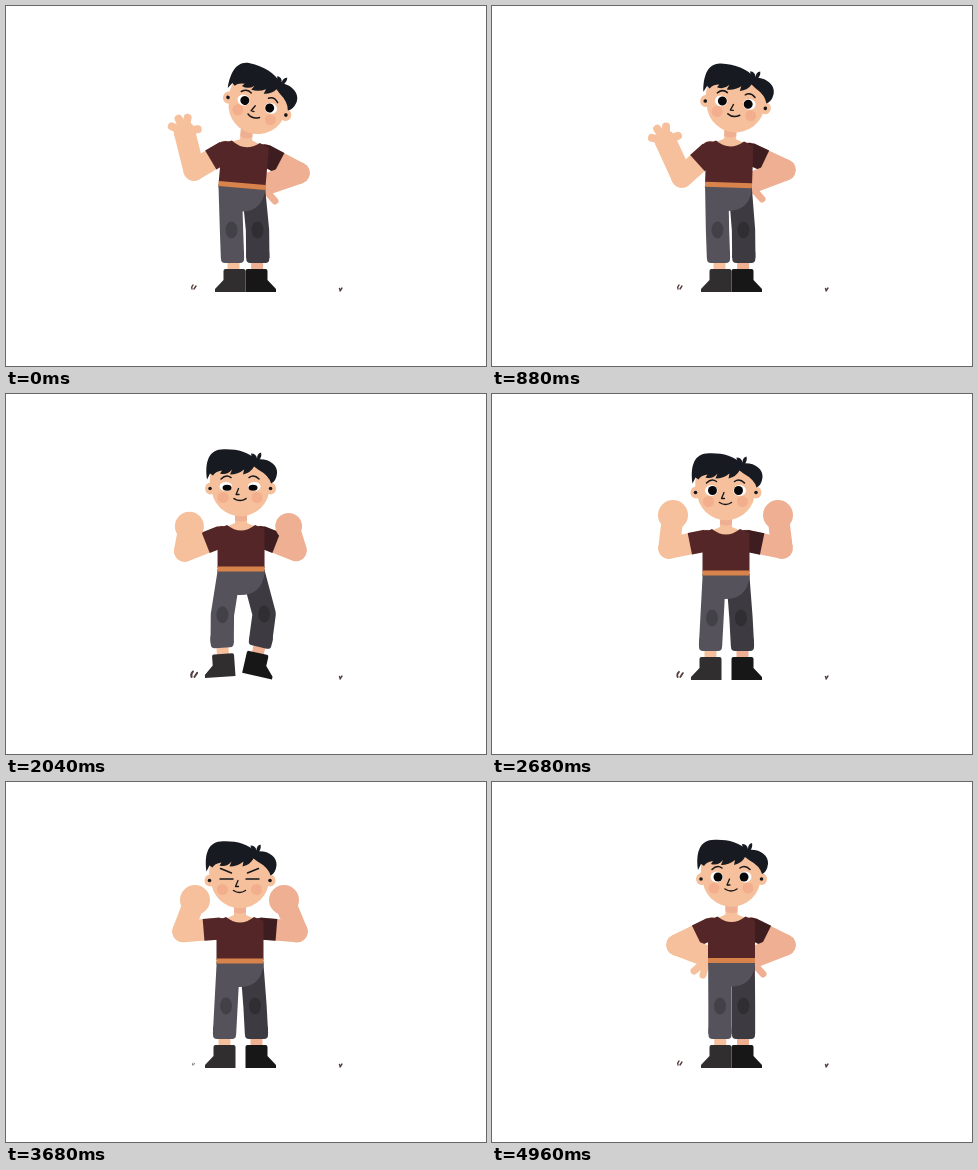
Recreate the animation shown at these times as an HTML page with a canvas. Size 480 by 360 pixels, loop 5000 ms.

```html
<!DOCTYPE html>
<html lang="en">
<head>
<meta charset="utf-8">
<title>Waving and flexing</title>
<style>
  html, body { margin: 0; width: 100%; height: 100%; overflow: hidden; background: #fff; }
  canvas { display: block; }
</style>
</head>
<body>
<canvas id="stage" width="480" height="360"></canvas>
<script>
const ctx = document.getElementById('stage').getContext('2d');
const LOOP = 5000, TAU = Math.PI * 2, DEG = Math.PI / 180;
const C = {
  skin: '#f5c09b', shade: '#eeaf92', cheek: '#f2ae8d', shirt: '#552628', sleeve: '#3e1d21',
  pants: '#55525b', pantsDark: '#3d3b41', knee: '#434148', kneeDark: '#302e32',
  belt: '#d8834c', shoe: '#302e2e', shoeDark: '#181717', hair: '#171a21', grass: '#54403c'
};

// body, head: x, y, degrees; arms: elbow, hand; legs: knee, hem, degrees, shoe shift
// hands: fists, open hand, left on hip, right on hip; face: lid, frown; grass: left, right
const stand = {
  body: [239.5, 178.5, 0], head: [0, 0, 0],
  armL: [185, 163, 222, 177], armR: [293, 163, 257, 177],
  legL: [228, 224, 228, 257, 0, 0.5], legR: [251.5, 224, 251.5, 257, 0, -1],
  hands: [0, 0, 1, 1], face: [0, 0], grass: [1, 1]
};
const waveIn = {
  ...stand, body: [236, 179.5, 5], head: [2, 2, 17],
  armL: [188, 164, 178.5, 126], armR: [293, 167, 255, 180],
  legL: [225.5, 224, 226.5, 257, 0, 2], legR: [251.5, 224, 251.8, 257, 0, -1.3],
  hands: [0, 1, 0, 1]
};
const wave = {
  ...waveIn, body: [236.5, 179, 2], head: [0, 1.5, 7],
  armL: [190, 171, 173.5, 135], armR: [293, 164, 256, 178]
};
const waveOut = { ...wave, head: [0.6, 1.6, 9], armL: [190, 171, 168, 138] };
const waveEnd = {
  ...waveIn, body: [236.2, 178.6, 2.7], head: [2, 2, 11],
  armL: [188, 168, 180, 129], armR: [292.5, 165.5, 255, 178], grass: [0, 1]
};
const flex = {
  ...stand, body: [234, 179, 0], head: [-5.5, 1.5, 0],
  armL: [177, 154, 181, 121], armR: [290, 154, 286, 121],
  legL: [220, 224, 218.5, 257, 0, 0], legR: [249, 224, 250.5, 257, 0, 0],
  hands: [1, 0, 0, 0], grass: [1.3, 1]
};
const squeeze = {
  ...flex, armL: [177, 149.5, 189, 118], armR: [291, 149.5, 278, 118], face: [1, 1], grass: [0.5, 1]
};
const hop = {
  ...flex, body: [235.5, 174, 0], head: [-4.5, -3.5, 0],
  armL: [180, 156, 213, 161], armR: [290, 156, 258, 161],
  legL: [215.5, 220, 216, 253, -5, 0], legR: [260.5, 219, 254, 252, 16, 0],
  hands: [0.9, 0, 0, 0], face: [0.4, 0], grass: [1.4, 1]
};
const hopUp = { ...hop, armL: [180, 159, 184, 135], armR: [290, 158, 280, 140], hands: [0.8, 0.2, 0, 0] };

const keys = [
  [0, waveIn], [300, waveOut], [540, { ...waveIn, head: [1, 1.8, 12] }], [760, waveOut],
  [880, wave], [1140, waveEnd], [1720, waveEnd], [1960, hopUp], [2240, flex],
  [2700, flex], [3000, squeeze], [3920, squeeze], [4200, hop], [4480, stand], [LOOP, stand]
];

// Smooth interpolation that passes through the keys without overshoot
function sample(time) {
  let i = 0;
  while (i < keys.length - 2 && time >= keys[i + 1][0]) i++;
  const [t0, from] = keys[i], [t1, to] = keys[i + 1], span = t1 - t0, u = (time - t0) / span;
  const pose = {};
  for (const part in stand) {
    pose[part] = from[part].map((a, n) => {
      const slope = k => keys[k] && keys[k + 1]
        ? (keys[k + 1][1][part][n] - keys[k][1][part][n]) / (keys[k + 1][0] - keys[k][0]) : 0;
      const tangent = k => {
        const p = slope(k - 1), q = slope(k);
        return p * q > 0 ? 2 * p * q / (p + q) : 0;
      };
      const b = to[part][n], v = 1 - u;
      return a * v * v * (1 + 2 * u) + b * u * u * (3 - 2 * u)
        + span * u * v * (tangent(i) * v - tangent(i + 1) * u);
    });
  }
  return pose;
}

function fill(path, color) {
  ctx.fillStyle = color;
  ctx.fill(new Path2D(path));
}
function stroke(path, color, width) {
  ctx.strokeStyle = color;
  ctx.lineWidth = width;
  ctx.stroke(new Path2D(path));
}
function oval(x, y, rx, ry, color) {
  ctx.fillStyle = color;
  ctx.beginPath();
  ctx.ellipse(x, y, rx, ry, 0, 0, TAU);
  ctx.fill();
}
function line(points, color, width, cap = 'round') {
  ctx.lineCap = cap;
  ctx.lineWidth = width;
  ctx.strokeStyle = color;
  ctx.beginPath();
  points.forEach(p => ctx.lineTo(...p));
  ctx.stroke();
  ctx.lineCap = 'round';
}
function at(x, y, degrees, draw) {
  ctx.save();
  ctx.translate(x, y);
  ctx.rotate(degrees * DEG);
  draw();
  ctx.restore();
}
function onBody([x, y, lean], dx, dy) {
  const c = Math.cos(lean * DEG), s = Math.sin(lean * DEG);
  return [x + dx * c - dy * s, y + dx * s + dy * c];
}

function drawArm(pose, side) {
  const left = side < 0, color = left ? C.skin : C.shade, cloth = left ? C.shirt : C.sleeve;
  const [ex, ey, hx, hy] = left ? pose.armL : pose.armR;
  const [fist, open, hipL, hipR] = pose.hands;
  const [sx, sy] = onBody(pose.body, side * 19.5, -32.5);
  const k = 17 / Math.hypot(ex - sx, ey - sy);
  line([[sx, sy], [ex, ey]], color, 21.5);
  oval(sx, sy, 10.5, 10.5, cloth);
  line([[sx, sy], [sx + (ex - sx) * k, sy + (ey - sy) * k]], cloth, 22, 'butt');
  line([[ex, ey], [hx, hy]], color, 21.5);

  const palm = fist * 15 + (left ? open * 10.7 : 0);
  if (palm > 0) oval(hx, hy, palm, palm, color);
  if (left && open > 0.05) {
    at(hx, hy, Math.atan2(hy - ey, hx - ex) / DEG + 90, () => {
      for (const [x, y] of [[-11, -8.5], [-2.5, -14.5], [6.5, -13], [13.5, 0.5]]) {
        line([[0, 0], [x * open, y * open]], color, 8);
      }
    });
  }
  const hip = left ? hipL : hipR;
  if (hip > 0.05) {
    const finger = (x, y, dx, dy) =>
      line([[hx + x, hy + y], [hx + x + dx * hip, hy + y + dy * hip]], color, 7 * hip);
    if (left) {
      finger(-13, 6, -7, 6);
      finger(-9, 8, -2, 8);
    } else {
      finger(6, 6, 8, 9);
    }
  }
}

function drawLeg(pose, side) {
  const left = side < 0, color = left ? C.pants : C.pantsDark;
  const [kx, ky, x, y, turn, shift] = left ? pose.legL : pose.legR;
  at(x, y, turn, () => {
    ctx.fillStyle = left ? C.skin : C.shade;
    ctx.fillRect(shift / 2 - 6, -3, 12, 11);
    ctx.save();
    ctx.translate(shift, 0);
    ctx.scale(-side, 1);
    fill('M-9 6H9Q11 6 11 8V29H-19.5V26L-11 17V8Q-11 6-9 6Z', left ? C.shoe : C.shoeDark);
    ctx.restore();
    ctx.fillStyle = color;
    ctx.beginPath();
    ctx.roundRect(-11.5, -14, 23, 14, 4);
    ctx.fill();
  });
  const a = turn * DEG;
  line([onBody(pose.body, side * 11.7, 2), [kx, ky], [x + 5 * Math.sin(a), y - 5 * Math.cos(a)]], color, 23.3, 'butt');
}

function drawTorso(pose) {
  at(...pose.body, () => {
    fill('M-23.5 0H23.5V4Q21 26-1 26H-10L-23.5 3Z', C.pants);
  });
  oval(pose.legL[0], pose.legL[1], 6, 8.5, C.knee);
  oval(pose.legR[0], pose.legR[1], 6, 8.5, C.kneeDark);
  at(...pose.body, () => {
    fill('M-6-58H6V-46L15-42Q0-30-15-42L-6-46Z', C.skin);
    fill('M-6-58H6V-49Q0-46-6-49Z', C.shade);
    fill('M-14-44Q0-33 14-44L23.5-40V-1H-23.5V-40Z', C.shirt);
    ctx.fillStyle = C.belt;
    ctx.fillRect(-23.5, -2.5, 47, 5);
  });
}

function drawFace(lid, frown) {
  const ink = '#15161b', mix = (a, b) => a + (b - a) * frown;
  oval(222, 106, 5.5, 5.5, C.cheek);
  oval(256, 106, 5.5, 5.5, C.cheek);
  for (const side of [-1, 1]) {
    const x = 239 + side * 13;
    if (lid > 0.85) {
      stroke(`M${x - 6.5} 95.5h13`, ink, 1.4);
    } else {
      oval(x + side * 1.2, 95, 6.3, 5.4 * Math.sqrt(1 - lid), '#fff');
      oval(x, 95 + lid * 4, 4.5, 4.5 * (1 - lid), '#08080a');
    }
    const inner = 239 + side * mix(9, 8), outer = 239 + side * 19;
    stroke(`M${inner} ${mix(86, 89.5)}Q${239 + side * 14} ${mix(82.5, 87)} ${outer} ${mix(87.5, 85)}`, ink, 1.5);
  }
  stroke('M237.5 97L235 103H238', ink, 1.3);
  stroke('M233 107Q239 111 245 107', ink, 1.5);
}

function drawHead(pose) {
  const [dx, dy, tilt] = pose.head;
  at(240 + dx, 130 + dy, tilt, () => {
    ctx.translate(-240, -130);
    for (const x of [209.5, 269.5]) oval(x, 97, 5.5, 6, C.skin);
    oval(239.5, 96, 29, 28.7, C.skin);
    fill('M210 97Q206 84 214 72H264Q271 84 269 97Z', C.skin);
    for (const x of [209, 269.5]) oval(x, 97, 1.8, 1.8, '#17171b');
    drawFace(...pose.face);
    fill('M206 88C204 74 206 59 220 58C234 57 247 60 255 68C267 66 277 73 276 82'
      + 'Q275 90 270 92Q268 84 257 78L253 75Q250 81 242 83L243 78Q237 83 229 83L231 78'
      + 'Q226 84 219 82L221 79Q214 80 212 84L209 82Z', C.hair);
    fill('M255 69Q250 66 250 62Q255 62 256 67Q256 62 260 61Q261 65 258 69Z', C.hair);
  });
}

function drawGrass([left, right]) {
  const tuft = (x, y, size, path) => {
    if (size < 0.1) return;
    ctx.save();
    ctx.translate(x, y);
    ctx.scale(size, size);
    stroke(path, C.grass, 1.4);
    ctx.restore();
  };
  tuft(187, 283, left, 'M-1 0Q-2-2 0-4M1 0L3-3');
  tuft(334, 285, right, 'M0 0L2-3M0-1L-.5-2.5');
}

function frame() {
  const pose = sample(performance.now() % LOOP);
  ctx.fillStyle = '#fff';
  ctx.fillRect(0, 0, 480, 360);
  ctx.lineCap = ctx.lineJoin = 'round';
  drawGrass(pose.grass);
  drawArm(pose, -1);
  drawArm(pose, 1);
  drawLeg(pose, 1);
  drawLeg(pose, -1);
  drawTorso(pose);
  drawHead(pose);
  requestAnimationFrame(frame);
}
frame();
</script>
</body>
</html>
```
